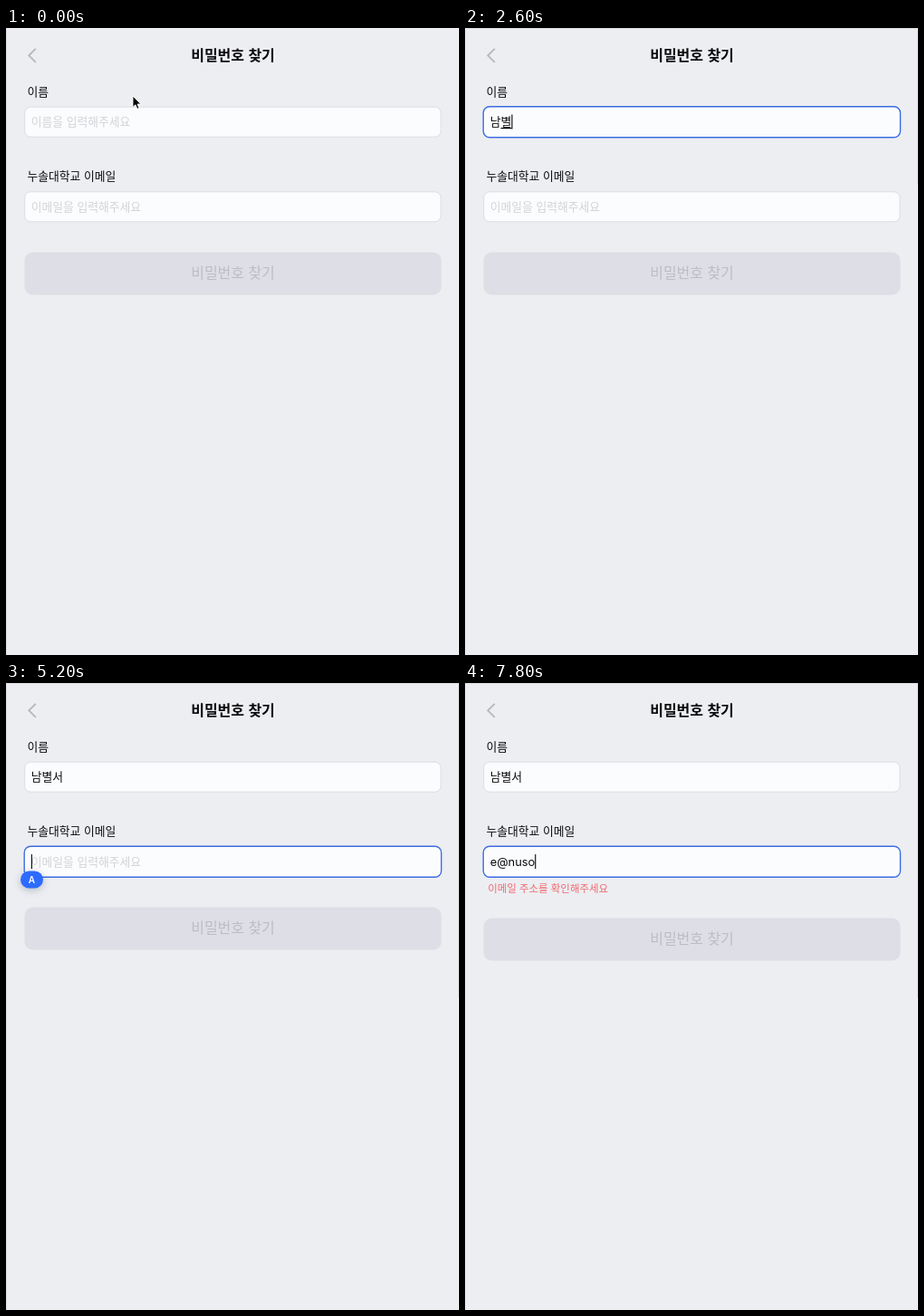
An HTML page that plays this animation: 500x692 px, repeating every 8 s.

```html
<!DOCTYPE html>
<html lang="ko">
<head>
<meta charset="utf-8">
<title>비밀번호 찾기</title>
<style>
  html, body { margin: 0; width: 100%; height: 100%; overflow: hidden; background: #edeef2; }
  svg { display: block; width: 500px; height: 692px; }
  text { font: 12.8px "Noto Sans CJK KR", "Noto Sans CJK", sans-serif; fill: #0b0b0d; white-space: pre; }
  .title { font-size: 16px; font-weight: 600; letter-spacing: -.05px; text-anchor: middle; }
  .label { font-weight: 500; }
  .hint { fill: #d3d3d7; }
  .latin { font-family: Inter, sans-serif; }
  .box { fill: #fbfcfe; stroke: #dcdde2; stroke-width: 1; }
  .box.focus { stroke: #3c6de0; stroke-width: 1.4; }
  .button text { font-size: 16px; fill: #bdbdc3; letter-spacing: -.05px; text-anchor: middle; }
  .error { font-size: 11.45px; fill: #ee6a6e; }
  .badge { filter: drop-shadow(0 2px 4px rgba(20, 30, 60, .25)); }
  .badge text { font: 600 10px Inter, sans-serif; fill: #fff; text-anchor: middle; }
  .edge { fill: #d9dade; }
</style>
</head>
<body>
<svg viewBox="0 0 500 692">
  <rect width="500" height="692" fill="#edeef2"/>
  <rect class="edge" width="1" height="692" opacity=".7"/>
  <rect class="edge" id="topEdge" width="500" height="1"/>
  <rect class="edge" id="rightEdge" x="499" width="1"/>

  <path d="M32.8 22.8 25.3 30.3 32.8 37.8" fill="none" stroke="#b7b8be" stroke-width="1.9"/>
  <text class="title" x="250.5" y="36">비밀번호 찾기</text>

  <text class="label" x="23.5" y="74.7">이름</text>
  <g id="name"></g>
  <text class="label" x="23.5" y="168.2">누솔대학교 이메일</text>
  <g id="email"></g>

  <text class="error" id="error" x="25.3" y="230.8">이메일 주소를 확인해주세요</text>
  <g class="button" id="button">
    <rect x="20.5" y="247.5" width="460" height="47" rx="9" fill="#dddee6"/>
    <text x="250.5" y="275.6">비밀번호 찾기</text>
  </g>

  <g class="badge" id="badge">
    <rect x="16" y="207.5" width="25" height="19" rx="9.5" fill="#2d6bff"/>
    <text x="28.5" y="220.8">A</text>
  </g>
  <path id="arrow" d="M0 0V12.4L2.9 9.8 4.9 14.3 7 13.4 5 9H8.8Z" fill="#000" stroke="#fff" stroke-width=".9"/>
  <path id="beam" d="M-2.5-7.5Q0-7.5 0-5.5Q0-7.5 2.5-7.5M0-5.5V5.5M-2.5 7.5Q0 7.5 0 5.5Q0 7.5 2.5 7.5" fill="none" stroke="#222" stroke-width="1"/>
</svg>
<script>
const LOOP = 8000;
const LEFT = 27.8;
const FOCUS_NAME = 700, FOCUS_EMAIL = 3900, HIDE_POINTER = 1300;
const SHOW_BADGE = 4800, SHOW_ERROR = 5400;

const nameSteps = [
  [0, ''], [1300, 'ㄴ'], [1600, '나'], [1800, '남'], [2000, '남ㅂ'],
  [2200, '남벼'], [2400, '남별'], [2700, '남볈'], [2800, '남별서']
];
const emailSteps = [
  [0, ''], [5400, 'e'], [5700, 'e@'], [6600, 'e@n'],
  [6800, 'e@nu'], [7200, 'e@nus'], [7600, 'e@nuso']
];
const caretSteps = [
  [0, false], [700, true], [1200, false], [1300, true], [3400, false],
  [3900, true], [4400, false], [4900, true], [6000, false], [6600, true]
];
const pointerPath = [[0, 140, 75], [100, 140, 75], [300, 134, 59], [600, 122, 101]];

const $ = id => document.getElementById(id);
const show = (node, on) => node.setAttribute('visibility', on ? 'visible' : 'hidden');
const valueAt = (steps, t) => steps.findLast(step => step[0] <= t)[1];

function add(parent, tag, attrs, text = '') {
  const node = document.createElementNS('http://www.w3.org/2000/svg', tag);
  for (const key in attrs) node.setAttribute(key, attrs[key]);
  node.textContent = text;
  return parent.appendChild(node);
}

function makeField(id, top, hint, valueClass) {
  const group = $(id), y = top + 21.2;
  const box = add(group, 'rect', {});
  const hintText = add(group, 'text', { class: 'hint', x: LEFT, y }, hint);
  const value = add(group, 'text', { class: valueClass, x: LEFT, y });
  const underline = add(group, 'rect', { y: top + 23, height: 1.2 });
  const caret = add(group, 'rect', { y: top + 8.5, width: 1.1, height: 16 });
  const widthOf = text => {
    value.textContent = text;
    return text ? value.getComputedTextLength() : 0;
  };

  return (text, focused, caretOn, composing) => {
    const grow = focused ? 0.5 : 0;
    box.setAttribute('class', focused ? 'box focus' : 'box');
    for (const [key, v] of Object.entries({
      x: 20.7 - grow, y: top + .2 - grow,
      width: 459.3 + 2 * grow, height: 33 + 2 * grow, rx: 6.5 + grow
    })) box.setAttribute(key, v);

    show(hintText, !text);
    const before = widthOf(text.slice(0, -1));
    const width = widthOf(text);
    underline.setAttribute('x', LEFT + before);
    underline.setAttribute('width', width - before);
    show(underline, composing && text);
    caret.setAttribute('x', LEFT + width);
    show(caret, focused && caretOn);
  };
}

const drawName = makeField('name', 87, '이름을 입력해주세요', 'label');
const drawEmail = makeField('email', 180.6, '이메일을 입력해주세요', 'latin');

function drawPointer(t) {
  const i = pointerPath.findLastIndex(p => p[0] <= t);
  const a = pointerPath[i], b = pointerPath[i + 1] || a;
  const k = b === a ? 0 : (t - a[0]) / (b[0] - a[0]);
  const ease = k * k * (3 - 2 * k);
  const x = a[1] + (b[1] - a[1]) * ease;
  const y = a[2] + (b[2] - a[2]) * ease;
  const inField = y > 87;
  for (const id of ['arrow', 'beam']) $(id).setAttribute('transform', `translate(${x} ${y})`);
  show($('arrow'), t < HIDE_POINTER && !inField);
  show($('beam'), t < HIDE_POINTER && inField);
}

function draw(t) {
  const onName = t >= FOCUS_NAME && t < FOCUS_EMAIL;
  const onEmail = t >= FOCUS_EMAIL;
  const caretOn = valueAt(caretSteps, t);
  drawName(valueAt(nameSteps, t), onName, caretOn, onName);
  drawEmail(valueAt(emailSteps, t), onEmail, caretOn, false);

  const invalid = t >= SHOW_ERROR;
  show($('error'), invalid);
  $('button').setAttribute('transform', `translate(0 ${invalid ? 12 : 0})`);
  show($('badge'), t >= SHOW_BADGE && !invalid);
  $('badge').setAttribute('opacity', Math.max(0, Math.min(1, (t - SHOW_BADGE + 40) / 150)));

  show($('topEdge'), t >= 1000);
  $('rightEdge').setAttribute('height', t < 1000 ? 0 : onEmail ? 347 : 173);
  drawPointer(t);
}

const start = performance.now();
function tick() {
  draw((performance.now() - start) % LOOP);
  requestAnimationFrame(tick);
}
tick();
</script>
</body>
</html>
```
